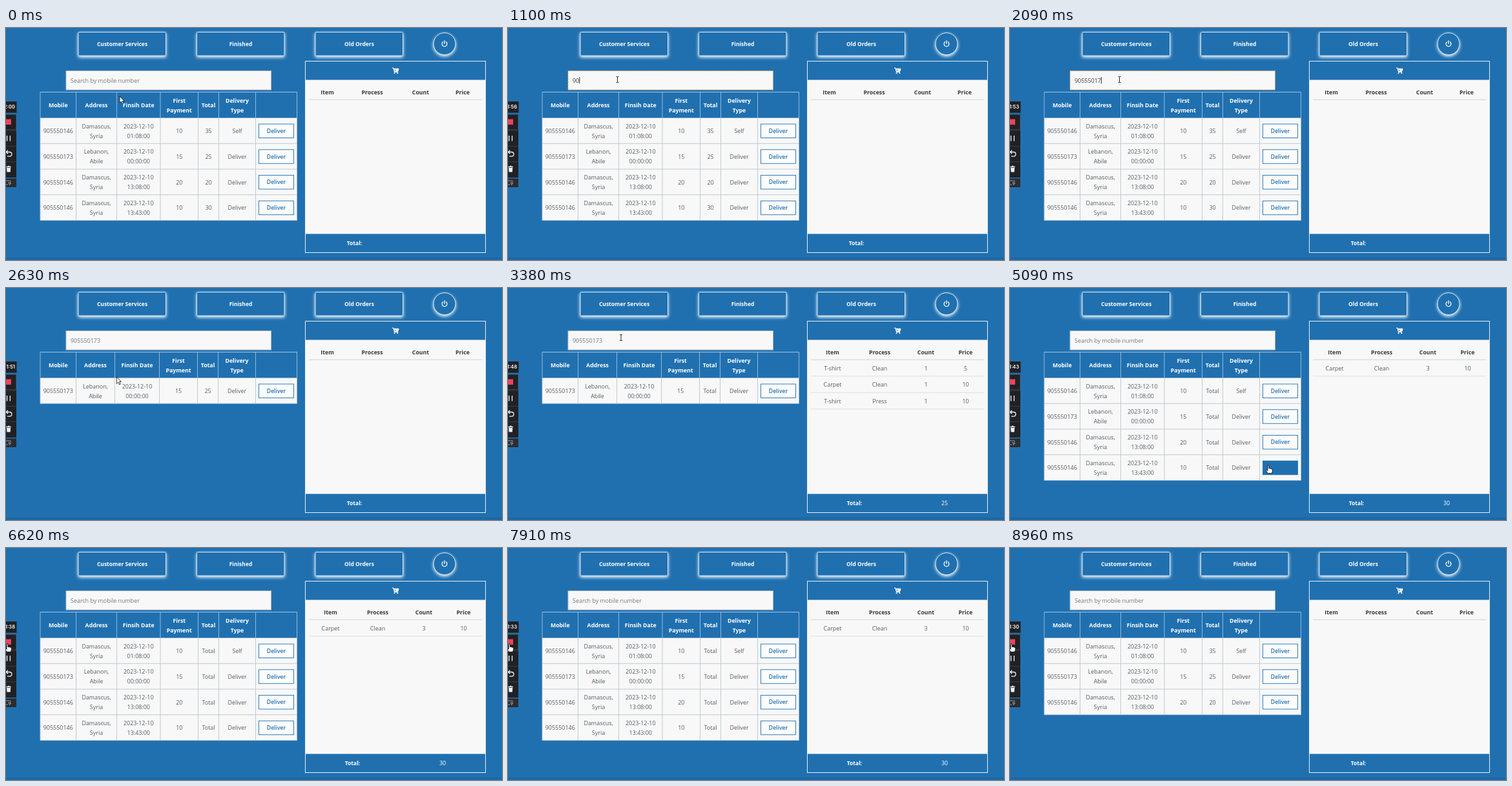
These frames come from a looping animation (768x360 px, 8990 ms). An HTML page:

```html
<!DOCTYPE html>
<html lang="en">
<head>
<meta charset="utf-8">
<title>Order desk</title>
<style>
  html, body { margin: 0; width: 100%; height: 100%; overflow: hidden; background: #2070b0; }
  svg { display: block; width: 768px; height: 360px; font: 8.95px "Open Sans", "Noto Sans", sans-serif; }
  text { fill: #565d64; text-anchor: middle; white-space: pre; }
  .left { text-anchor: start; }
  .head { font-weight: 700; font-size: 8.75px; }
  .dark { fill: #343a40; }
  .white { fill: #fff; }
  .nav { font-weight: 700; font-size: 8.5px; fill: #fff; }
  .action { font-weight: 600; font-size: 8.6px; fill: #2070b0; }
  .raised { fill: #2070b0; stroke: #d5e5f2; stroke-width: 1; filter: drop-shadow(0 2px 2.5px #fff); }
  .tool { fill: none; stroke: #f2f2f2; stroke-width: 1.3; }
</style>
</head>
<body>
<svg viewBox="0 0 768 360">
  <rect width="768" height="360" fill="#2070b0"/>
  <rect y="356" width="768" height="4" fill="#1d68a5"/>
  <g id="nav"></g>
  <circle class="raised" cx="679" cy="24.5" r="17"/>
  <path d="M676.6 21.6a3.9 3.9 0 1 0 4.8 0M679 19.7v4.6" fill="none" stroke="#fff" stroke-width="1.3" stroke-linecap="round"/>

  <rect id="field" x="93" y="66.5" width="317.5" height="29.5" fill="#f8f8f8"/>
  <text id="query" class="left" x="100" y="84.5"></text>
  <path id="caret" stroke="#222" stroke-width=".9"/>

  <g id="table"></g>

  <rect x="463.5" y="51.5" width="279" height="297" fill="#2070b0" stroke="#e6eef5"/>
  <rect x="464" y="80.5" width="278" height="239" fill="#f8f8f8"/>
  <path d="M598 62h1.9l1.6 6.2h5.6M600.6 63.2h7.4l-1 3.8h-5.6z" fill="#fff" stroke="#fff" stroke-width="1"/>
  <circle cx="601.6" cy="70" r="1.1" fill="#fff"/><circle cx="606.3" cy="70" r="1.1" fill="#fff"/>
  <g id="basket"></g>

  <g fill="#202124">
    <rect y="114" width="16.5" height="17.5"/>
    <rect y="134" width="16" height="98"/>
    <rect y="233.5" width="16" height="13.5" fill="#2b2d30"/>
  </g>
  <path d="M0 134.5H15.5V157.5H0M0 159H16M0 183.5H16M0 207.5H16" fill="none" stroke="#43464a" stroke-width=".8"/>
  <text id="clock" x="14" y="125.3" style="font:600 7.6px Inter,sans-serif;fill:#fff;text-anchor:end"></text>
  <rect y="141.5" width="8" height="8.5" fill="#ee4358"/>
  <path class="tool" d="M1.6 167v8.5M6.4 167v8.5" stroke-width="1.8"/>
  <path class="tool" d="M.6 192.5h5a3.2 3.2 0 0 1 0 6.6H2M3 189.8L.4 192.5L3 195.2"/>
  <path d="M.4 214.8h7.4v1.4H.4zM2.8 213.7h2.6v1.2H2.8zM1 217h6.2l-.5 6.5H1.5z" fill="#f2f2f2"/>
  <path d="M0 237h7v2.5M0 243h3M4 239.5l4 1.7-1.7.7-.7 1.8z" fill="none" stroke="#92969b"/>

  <g id="pointer">
    <path id="arrow" d="M0 0V10.2L2.4 8L4.1 11.8L5.8 11L4.2 7.4H7.2Z" fill="#fff" stroke="#111" stroke-width=".8"/>
    <path id="beam" d="M-2 -4.5H-.5L0 -4L.5 -4.5H2M0 -4V4M-2 4.5H-.5L0 4L.5 4.5H2" fill="none" stroke="#222" stroke-width="1"/>
    <path id="hand" d="M-1 .4Q0 -.7 1 .4V5Q2.1 4.2 3 5.3Q4.1 4.6 4.9 5.8Q6.3 5.4 6.4 7V9.5L5.4 12.7H-.6L-3.6 8.5Q-3.4 7 -2.2 7.6L-1 8.8Z" fill="#fff" stroke="#111" stroke-width=".9" stroke-linejoin="round"/>
  </g>
</svg>
<script>
const LOOP = 8990;
const BLUE = '#2070b0';
const $ = id => document.getElementById(id);
const MOBILE_A = '905550146', MOBILE_B = '905550173';

const orders = [
  [MOBILE_A, 'Damascus,|Syria', '2023-12-10|01:08:00', 10, 35, 'Self'],
  [MOBILE_B, 'Lebanon,|Abile', '2023-12-10|00:00:00', 15, 25, 'Deliver'],
  [MOBILE_A, 'Damascus,|Syria', '2023-12-10|13:08:00', 20, 20, 'Deliver'],
  [MOBILE_A, 'Damascus,|Syria', '2023-12-10|13:43:00', 10, 30, 'Deliver']
];
const titles = ['Mobile', 'Address', 'Finsih Date', 'First|Payment', 'Total', 'Delivery|Type'];
const wideColumns = [53, 108.5, 171.5, 239, 297.5, 329.5, 386.5, 450.5];
const foundColumns = [53, 108.5, 168.5, 237.5, 296.5, 328.5, 386.5, 450.5];
const laundry = [['T-shirt', 'Clean', 1, 5], ['Carpet', 'Clean', 1, 10], ['T-shirt', 'Press', 1, 10]];
const carpets = [['Carpet', 'Clean', 3, 10]];

// Each scene holds from its start time until the next one.
const scenes = [
  { at: 0, rows: orders },
  { at: 2450, rows: [orders[1]], found: true },
  { at: 2900, rows: [orders[1]], found: true, masked: true, items: laundry, sum: 25 },
  { at: 3750, rows: orders, masked: true, items: laundry, sum: 25 },
  { at: 4720, rows: orders, masked: true, items: carpets, sum: 30 },
  { at: 8500, rows: orders.slice(0, 3) }
];

// Pointer stops: time, x, y
const stops = [
  [0, 176, 106], [120, 176, 106], [560, 169.5, 80], [2450, 169.5, 80],
  [2720, 172, 158], [2950, 172, 158], [3300, 175, 77], [3760, 175, 77],
  [4200, 135.5, 158.5], [4380, 135.5, 158.5], [4640, 330, 276], [4740, 330, 276],
  [4940, 400, 275], [5480, 400, 275], [6200, 2, 148.5], [LOOP, 2, 148.5]
];

const text = (x, y, value, cls = '') => `<text class="${cls}" x="${x}" y="${y}">${value}</text>`;
const line = (x1, y1, x2, y2, color) => `<path d="M${x1} ${y1}L${x2} ${y2}" stroke="${color}" stroke-width=".9"/>`;

function cell(x, y, value, cls) {
  const parts = String(value).split('|');
  return parts.map((part, i) => text(x, y + (i - (parts.length - 1) / 2) * 15, part, cls)).join('');
}

function drawTable({ rows, found, masked }, hovered) {
  const edges = found ? foundColumns : wideColumns;
  const center = i => (edges[i] + edges[i + 1]) / 2;
  const top = 139.5, step = 39.75, bottom = top + rows.length * step;
  let out = `<rect x="53" y="99.5" width="397.5" height="40" fill="${BLUE}"/>` +
    `<rect x="53" y="${top}" width="397.5" height="${bottom - top}" fill="#f8f8f8"/>`;
  edges.forEach(x => {
    out += line(x, 99.5, x, top, '#9fc0dc') + line(x, top, x, bottom, '#bcc4cb');
  });
  out += line(53, 99.5, 450.5, 99.5, '#b5cfe4');
  titles.forEach((title, i) => out += cell(center(i), 123.3, title, 'head white'));
  rows.forEach((row, r) => {
    const y = top + r * step, active = r === hovered;
    out += line(53, y + step, 450.5, y + step, '#bcc4cb');
    row.forEach((value, i) => out += cell(center(i), y + 23.5, masked && i === 4 ? 'Total' : value));
    out += `<rect x="391.5" y="${y + 9.5}" width="54" height="21.5" fill="${active ? BLUE : '#fcfcfc'}" stroke="${BLUE}" stroke-width=".9"/>` +
      text(418.5, y + 23.3, 'Deliver', active ? 'action white' : 'action');
  });
  return out;
}

function drawBasket({ items = [], sum }) {
  const columns = items.length ? [502.5, 575.5, 647, 708.5] : [497.5, 567, 642, 707];
  let out = line(469, 111.3, 737, 111.3, '#cdd1d5');
  ['Item', 'Process', 'Count', 'Price'].forEach((name, i) => out += text(columns[i], 102.5, name, 'head dark'));
  items.forEach((item, r) => {
    const y = 127.8 + r * 25.5;
    item.forEach((value, i) => out += text(columns[i], y, value));
    out += line(469, y + 9, 737, y + 9, '#d9dde0');
  });
  out += text(sum ? 536.5 : 539.5, 337.3, 'Total:', 'nav');
  return sum ? out + text(676, 337.3, sum, 'white') : out;
}

function pointerAt(t) {
  const i = stops.findIndex((stop, k) => t < stops[k + 1][0]);
  const [t0, x0, y0] = stops[i], [t1, x1, y1] = stops[i + 1];
  const p = (t - t0) / (t1 - t0), e = p * p * (3 - 2 * p);
  return [x0 + (x1 - x0) * e, y0 + (y1 - y0) * e];
}

function drawField(t) {
  const focused = (t >= 590 && t < 2450) || (t >= 3480 && t < 4100);
  const typed = Math.max(0, Math.min(9, Math.floor((t - 800) / 150)));
  const value = t < 3700 ? MOBILE_B.slice(0, typed) : '';
  const field = $('field'), query = $('query');
  field.setAttribute('stroke', focused ? '#e0a565' : '#b4bcc3');
  field.setAttribute('stroke-dasharray', focused ? '3 1.5' : 'none');
  query.textContent = value || 'Search by mobile number';
  query.style.fill = value && focused ? '#3c4248' : '#74797e';
  const x = 100.5 + (value ? query.getComputedTextLength() : 0);
  $('caret').setAttribute('d', focused ? `M${x} 76V86.5` : '');
}

let drawn = '';
function render(t) {
  const index = scenes.filter(scene => t >= scene.at).length - 1;
  const scene = scenes[index];
  const [x, y] = pointerAt(t);
  const row = Math.floor((y - 139.5) / 39.75);
  const overRow = x > 53 && x < 450 && row >= 0 && row < scene.rows.length;
  const offset = y - 139.5 - row * 39.75;
  const hovered = overRow && x > 391 && x < 446 && offset > 9 && offset < 31 ? row : -1;
  const key = index + ':' + hovered;
  if (key !== drawn) {
    $('table').innerHTML = drawTable(scene, hovered);
    $('basket').innerHTML = drawBasket(scene);
    drawn = key;
  }
  drawField(t);

  const left = 120 - Math.floor((t + 270) / 300);
  $('clock').textContent = `0${Math.floor(left / 60)}:${String(left % 60).padStart(2, '0')}`;

  const overField = x > 93 && x < 411 && y > 66 && y < 96;
  const shape = overField ? 'beam' : overRow || x < 16 ? 'hand' : 'arrow';
  ['arrow', 'beam', 'hand'].forEach(id => $(id).style.display = id === shape ? '' : 'none');
  $('pointer').setAttribute('transform', `translate(${x} ${y})`);
}

$('nav').innerHTML = ['Customer Services', 'Finished', 'Old Orders'].map((label, i) => {
  const x = 112 + i * 183.5;
  return `<rect class="raised" x="${x}" y="6.5" width="135.5" height="36.5" rx="1"/>` + text(x + 68, 27.7, label, 'nav');
}).join('');

const start = performance.now();
function tick() {
  render((performance.now() - start) % LOOP);
  requestAnimationFrame(tick);
}
tick();
</script>
</body>
</html>
```
